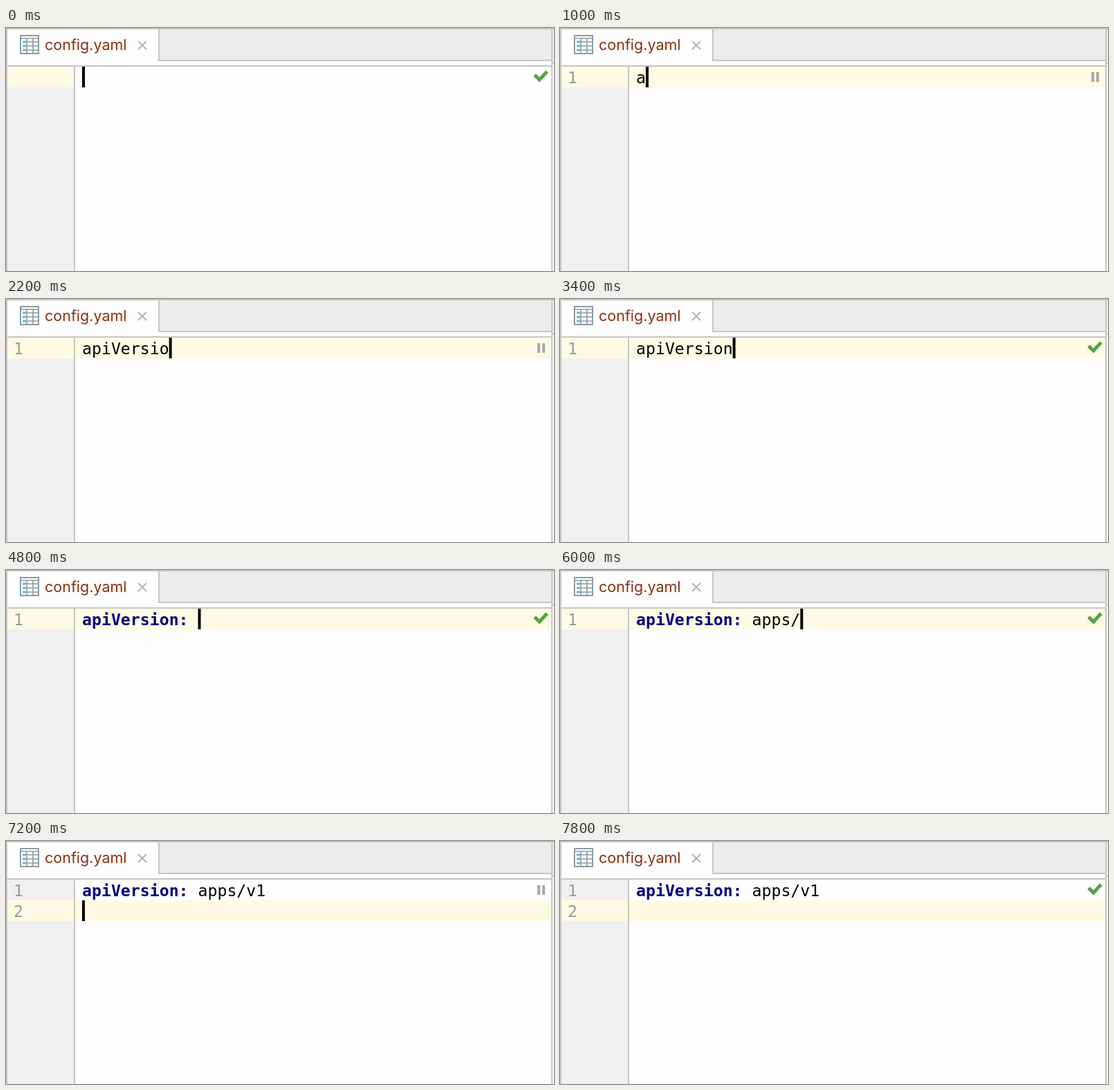
An HTML page that plays this animation: 792 px wide and 352 px high, repeating every 8 s.

```html
<!DOCTYPE html>
<html lang="en">
<head>
<meta charset="utf-8">
<title>Editor</title>
<style>
html, body { margin: 0; width: 100%; height: 100%; overflow: hidden; background: #fefefe; }
svg { display: block; }
.code { font: 23.2px "DejaVu Sans Mono", monospace; white-space: pre; }
.key { font-weight: bold; fill: #000080; }
.num { fill: #999; }
.tab { font: 21.5px Inter, sans-serif; fill: #8a2f10; }
</style>
</head>
<body>
<svg width="792" height="352" viewBox="0 0 792 352">
  <path fill="#ececec" d="M222 2h566v44H222zM790 2h2v48h-2z"/>
  <path fill="#f0f0f0" d="M2 56h96v296H2z"/>
  <path id="gutterRow" fill="#fffae3" d="M2 56h96v30H2z"/>
  <path id="row" fill="#fffae3" d="M100 56h688v30H100z"/>
  <path fill="#c6c6c6" d="M0 0h792v2H0zM0 2h2v350H0zM220 2h2v46h-2zM222 46h566v2H222zM2 54h786v2H2zM98 56h2v296h-2zM788 2h2v350h-2zM790 50h2v2h-2z"/>

  <g fill="none" stroke="#8d9aa3" stroke-width="2">
    <path fill="#fff" d="M21 11h26v26H21z"/>
    <path d="M21 15h26M30 15v22M39 15v22M30 20h17M30 26h17M30 32h17" stroke-width="1.6"/>
    <path d="M24 20h5M24 26h5M24 32h5" stroke="#5fb8d8" stroke-width="3"/>
  </g>
  <text class="tab" x="56" y="32">config.yaml</text>
  <path d="M191 19l12 12M203 19l-12 12" stroke="#b4b4b4" stroke-width="2"/>

  <g class="code">
    <text id="num1" class="num" x="11" y="80">1</text>
    <text id="num2" class="num" x="11" y="110">2</text>
    <text x="110" y="80" xml:space="preserve"><tspan id="key"></tspan><tspan id="value"></tspan></text>
  </g>
  <path id="caret" d="M0 0h4v30H0z"/>
  <path id="check" fill="none" stroke="#59a146" stroke-width="5" d="M764 68l7 7 11-12"/>
  <path id="pause" fill="#a9a9a9" d="M768 64h4v14h-4zM775 64h4v14h-4z"/>
</svg>
<script>
const LOOP = 8000, BLINK = 500, ANALYSIS = 350, ADVANCE = 13.96;
const ENTER = 7200;
const el = id => document.getElementById(id);
const show = (id, on) => el(id).setAttribute("visibility", on ? "visible" : "hidden");

// Bursts of typing: start, interval, characters
const keys = [
  [1000, 150, "apiVersion"], [4200, 200, ": "], [5000, 150, "apps/"], [6400, 200, "v1"]
].flatMap(([start, step, text]) => [...text].map((char, i) => ({ char, time: start + i * step })));

function draw(t) {
  const typed = keys.filter(k => k.time <= t);
  const text = typed.map(k => k.char).join("");
  const started = typed.length > 0, entered = t >= ENTER;
  const last = entered ? ENTER : started ? typed.at(-1).time : 100;
  const isPair = text.includes(": ");
  const split = isPair ? text.indexOf(":") + 1 : text.length;

  el("key").textContent = text.slice(0, split);
  el("key").setAttribute("class", isPair ? "key" : "");
  el("value").textContent = text.slice(split);

  const shift = `translate(0 ${entered ? 30 : 0})`;
  el("row").setAttribute("transform", shift);
  el("gutterRow").setAttribute("transform", shift);
  show("row", started);
  show("num1", started);
  show("num2", entered);

  const column = entered ? 0 : text.length;
  el("caret").setAttribute("transform", `translate(${110 + column * ADVANCE} ${entered ? 86 : 56})`);
  show("caret", t < last || Math.floor((t - last) / BLINK) % 2 === 0);

  const busy = started && t - last < ANALYSIS;
  show("pause", busy);
  show("check", !busy);
}

const begin = performance.now();
function frame() {
  draw((performance.now() - begin) % LOOP);
  requestAnimationFrame(frame);
}
frame();
</script>
</body>
</html>
```
